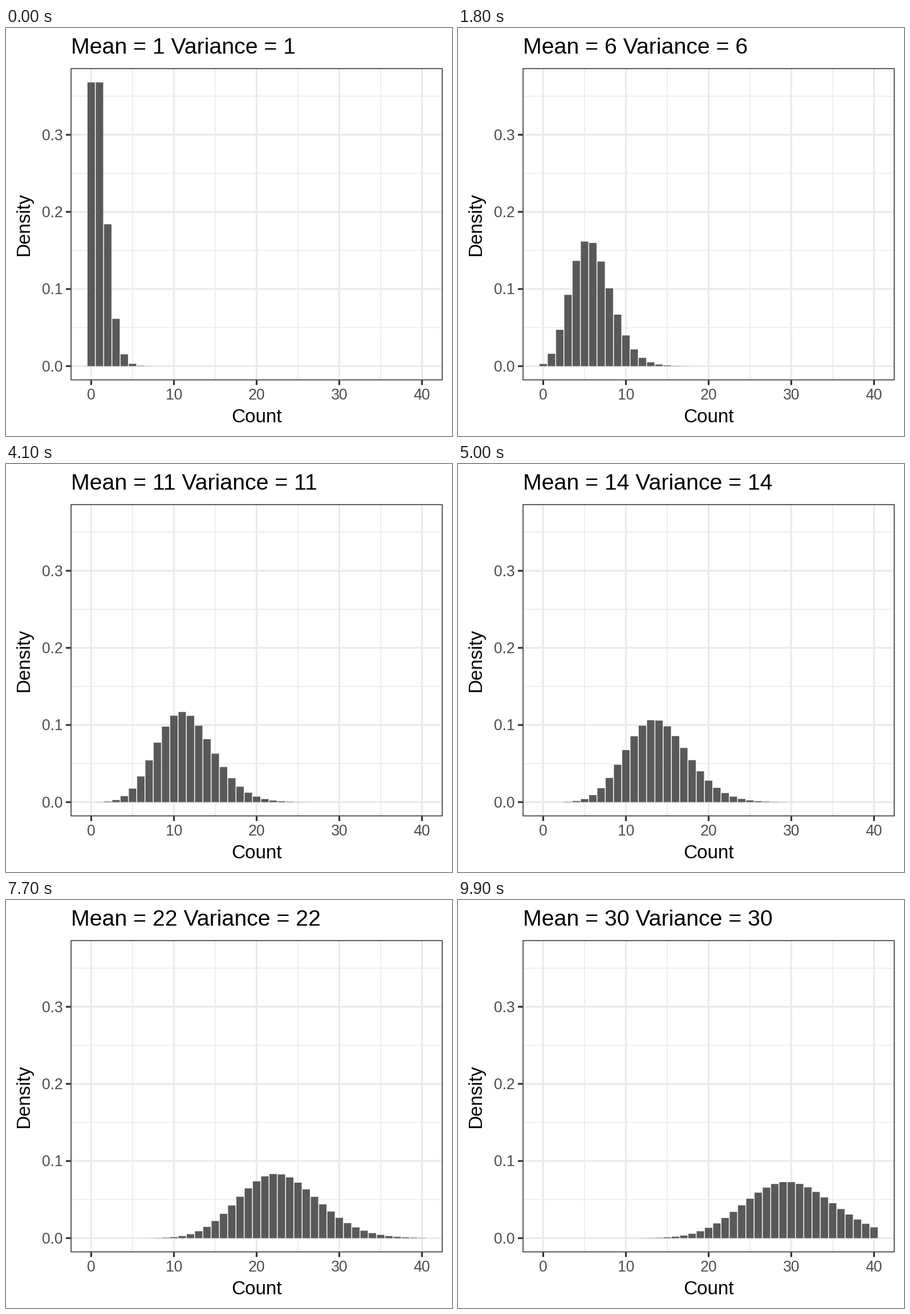
Recreate the animation shown at these times as a matplotlib script. Size 782 by 716 pixels, loop 10000 ms.

```python
import matplotlib.pyplot as plt
import numpy as np
from matplotlib.animation import FuncAnimation
from matplotlib.patches import Rectangle

W, H, DPI = 782, 716, 64
PT = 72 / DPI                      # points per pixel
FRAMES, INTERVAL = 100, 100
X0, XU = 149.4, 14.5               # pixel of count 0, pixels per count
Y0, YU = 593.4, 1353.5             # pixel of density 0, pixels per unit
LEFT, RIGHT, TOP, BOTTOM = 113.3, 765.6, 70.5, 618.3
LINE, TICK = 3.2, 8.2
GRID, DARK, LABEL, BAR = "#EBEBEB", "#333333", "#4D4D4D", "#595959"

plt.rcParams["font.family"] = "Liberation Sans"
fig = plt.figure(figsize=(W / DPI, H / DPI), dpi=DPI, facecolor="white")
ax = fig.add_axes([0, 0, 1, 1])
ax.set(xlim=(0, W), ylim=(H, 0))
ax.axis("off")

counts = np.arange(41)
log_fact = np.concatenate([[0], np.cumsum(np.log(counts[1:]))])


def px(count):
    return X0 + XU * count


def py(density):
    return Y0 - YU * density


def poisson(mean):
    return np.exp(counts * np.log(mean) - mean - log_fact)


def line(xs, ys, color, width, z):
    ax.plot(xs, ys, color=color, lw=width * PT, solid_capstyle="butt",
            snap=False, zorder=z)


def label(x, y, text, size, **kw):
    return ax.text(x, y, text, fontsize=size * PT, va="baseline", **kw)


def ease(t):
    """Cubic in-out."""
    return 4 * t ** 3 if t < 0.5 else 1 - 4 * (1 - t) ** 3


def pose(i):
    """Return start mean, progress to the next mean, and the mean shown."""
    if i < 52:
        block, step = divmod(i, 4)
        t = step / 3 if block == 0 else (step + 1) / 4
    else:
        block, step = divmod(i - 52, 3)
        block += 13
        t = (step + 1) / 3
    mean = block + 1
    return mean, t, mean + (step >= 2)


# grid
for c in range(5, 40, 10):
    line([px(c)] * 2, [TOP, BOTTOM], GRID, LINE / 2, 1)
for d in (0.05, 0.15, 0.25, 0.35):
    line([LEFT, RIGHT], [py(d)] * 2, GRID, LINE / 2, 1)
for c in range(0, 41, 10):
    line([px(c)] * 2, [TOP, BOTTOM], GRID, LINE, 2)
    line([px(c)] * 2, [BOTTOM, BOTTOM + TICK], DARK, LINE, 5)
    label(px(c), 652, str(c), 26.5, ha="center", color=LABEL)
for d in (0, 0.1, 0.2, 0.3):
    line([LEFT, RIGHT], [py(d)] * 2, GRID, LINE, 2)
    line([LEFT - TICK, LEFT], [py(d)] * 2, DARK, LINE, 5)
    label(100, py(d) + 9.4, f"{d:.1f}", 26.5, ha="right", color=LABEL)

# only the inner half of the panel border shows
b = LINE / 2
ax.add_patch(Rectangle((LEFT + b / 2, TOP + b / 2), RIGHT - LEFT - b,
                       BOTTOM - TOP - b, fill=False, ec=DARK, lw=b * PT,
                       snap=False, zorder=4))

label((LEFT + RIGHT) / 2, 692, "Count", 33.2, ha="center")
label(40.5, (TOP + BOTTOM) / 2, "Density", 33.2, ha="center", rotation=90,
      rotation_mode="anchor")
title = label(LEFT + 0.5, 45, "", 39.2, ha="left")

bars = [Rectangle((px(c - 0.45), Y0), 0.9 * XU, 0, fc=BAR, lw=0,
                  snap=False, zorder=3) for c in counts]
for bar in bars:
    ax.add_patch(bar)


def update(i):
    mean, t, shown = pose(i)
    k = ease(t)
    density = (1 - k) * poisson(mean) + k * poisson(mean + 1)
    for bar, d in zip(bars, density):
        bar.set_y(py(d))
        bar.set_height(YU * d)
    title.set_text(f"Mean = {shown} Variance = {shown}")
    return [*bars, title]


anim = FuncAnimation(fig, update, frames=FRAMES, interval=INTERVAL,
                     repeat=True, repeat_delay=0, blit=False)
plt.show()
```
